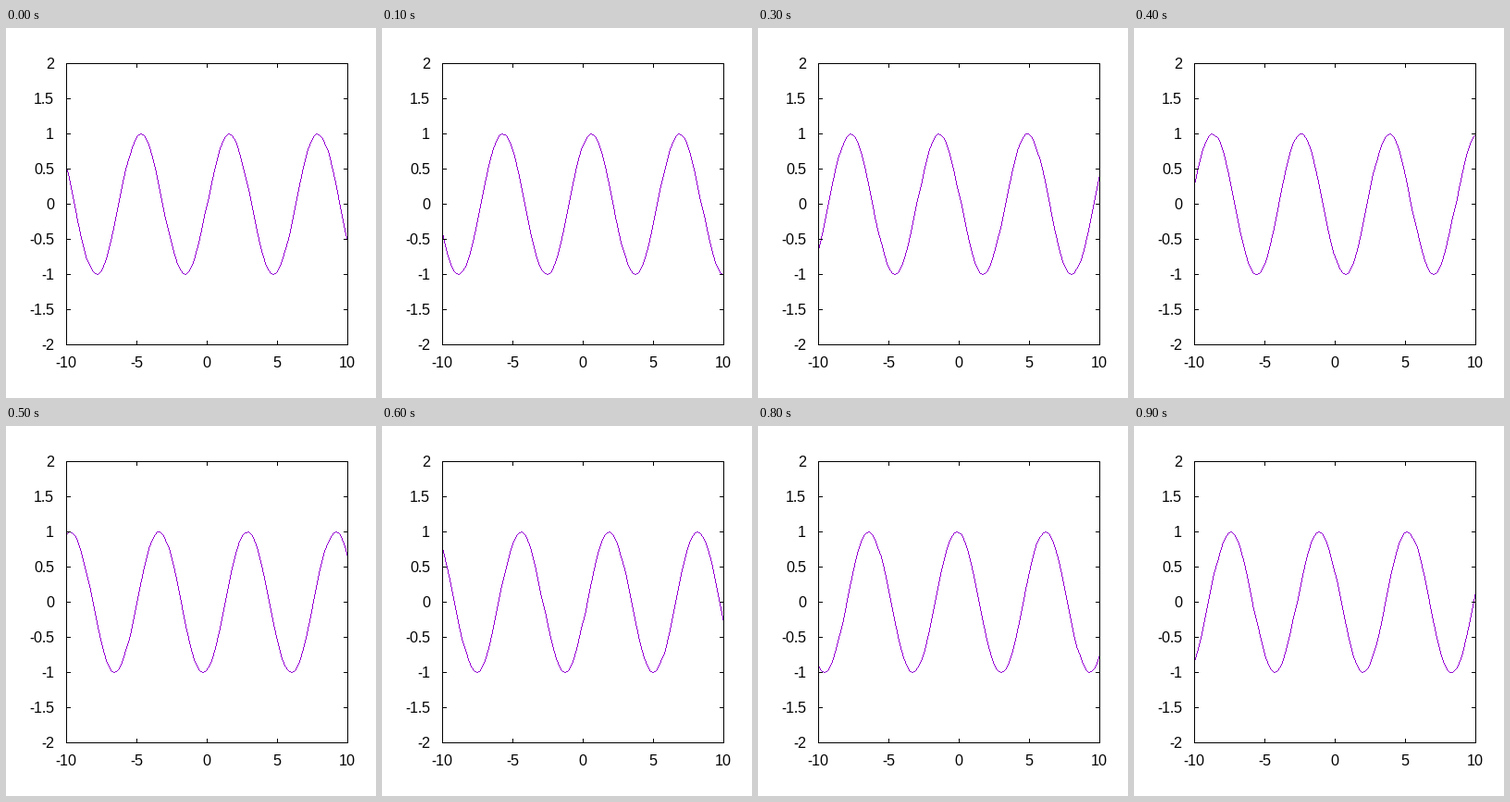
A matplotlib script for the animation above (1000 ms loop, 400x400 px).

```python
import numpy as np
import matplotlib.pyplot as plt
from matplotlib.animation import FuncAnimation

SIZE = 400
FRAMES, INTERVAL = 10, 100
LEFT, RIGHT, TOP, BOTTOM = 65, 369, 38, 342
TIC = 4
PURPLE, BLACK = (0x94, 0x00, 0xD3), (0, 0, 0)

plt.rcParams.update({
    "font.family": "Liberation Sans",
    "font.size": 16,
    "text.hinting": "default",
    "text.hinting_factor": 1,
})


def px(x):
    return LEFT + (x + 10) * (RIGHT - LEFT) / 20


def py(y):
    return BOTTOM - (y + 2) * (BOTTOM - TOP) / 4


def draw_line(img, x0, y0, x1, y1, color):
    """Draw a one-pixel line without smoothing."""
    steps = max(abs(x1 - x0), abs(y1 - y0), 1)
    t = np.arange(steps + 1) / steps
    cols = np.floor(x0 + (x1 - x0) * t + 0.5).astype(int)
    rows = np.floor(y0 + (y1 - y0) * t + 0.5).astype(int)
    img[rows, cols] = color


def draw_border(img):
    for x in (LEFT, RIGHT):
        draw_line(img, x, TOP, x, BOTTOM, BLACK)
    for y in (TOP, BOTTOM):
        draw_line(img, LEFT, y, RIGHT, y, BLACK)
    for x in px(np.arange(-10, 11, 5)).astype(int):
        draw_line(img, x, TOP, x, TOP + TIC, BLACK)
        draw_line(img, x, BOTTOM, x, BOTTOM - TIC, BLACK)
    for y in py(np.arange(-2, 2.5, 0.5)).astype(int):
        draw_line(img, LEFT, y, LEFT + TIC, y, BLACK)
        draw_line(img, RIGHT, y, RIGHT - TIC, y, BLACK)


def render(phase):
    img = np.full((SIZE, SIZE, 3), 255, np.uint8)
    x = np.linspace(-10, 10, 100)
    cols = np.floor(px(x) + 0.5).astype(int)
    rows = np.floor(py(np.sin(x + phase)) + 0.5).astype(int)
    for i in range(len(x) - 1):
        draw_line(img, cols[i], rows[i], cols[i + 1], rows[i + 1], PURPLE)
    draw_border(img)
    return img


fig = plt.figure(figsize=(SIZE / 72, SIZE / 72), dpi=72, facecolor="white")
ax = fig.add_axes([0, 0, 1, 1])
ax.axis("off")
picture = ax.imshow(render(0), extent=(0, SIZE, SIZE, 0),
                    interpolation="nearest", aspect="auto")

for value in np.arange(-2, 2.5, 0.5):
    ax.text(52, py(value) + 6, f"{value:g}", ha="right", va="baseline")
for value in range(-10, 11, 5):
    ax.text(px(value), 367, str(value), ha="center", va="baseline")


def update(frame):
    picture.set_data(render(frame))
    return [picture]


anim = FuncAnimation(fig, update, frames=FRAMES, interval=INTERVAL,
                     repeat=True, repeat_delay=0)
plt.show()
```
